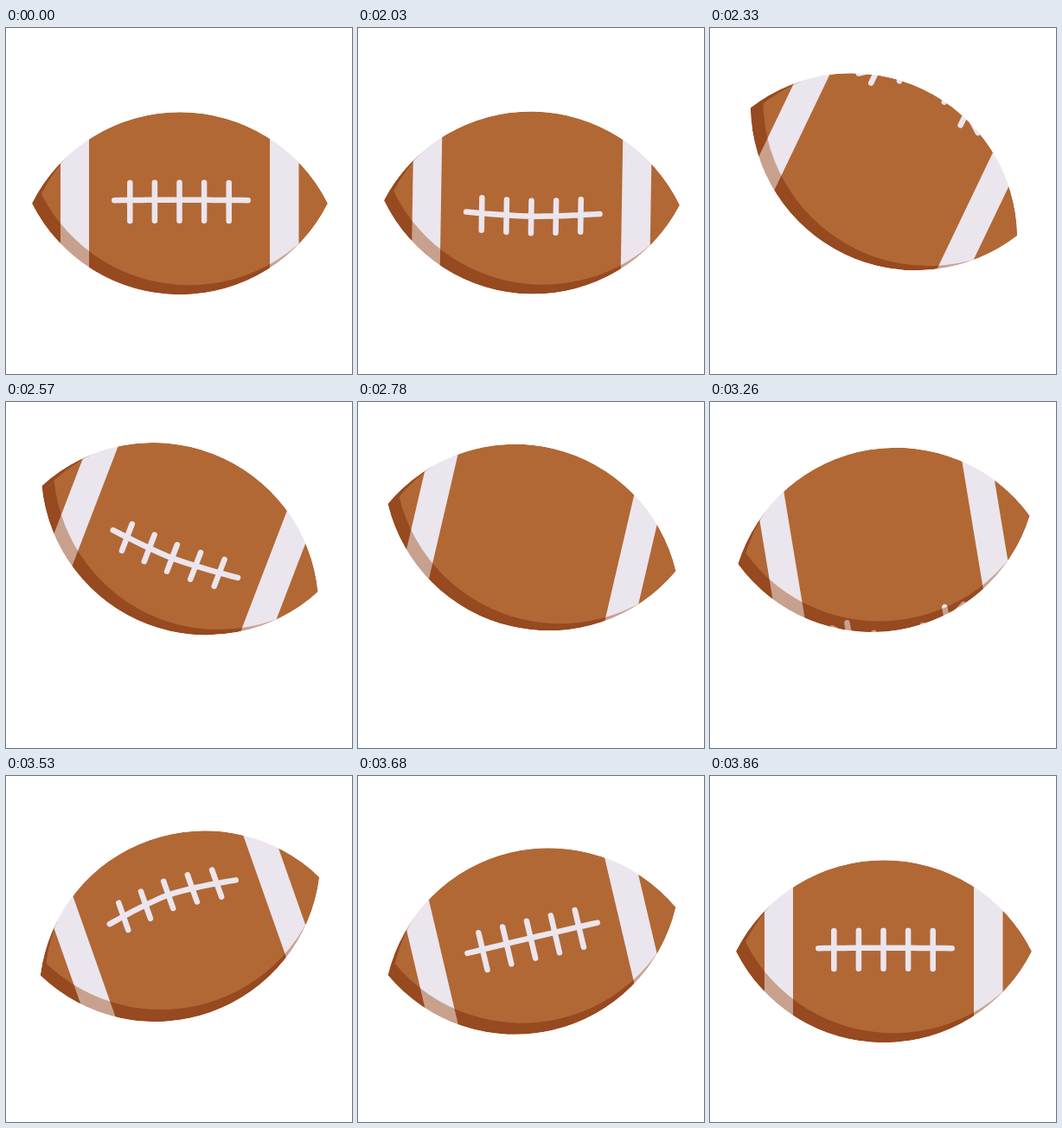
An HTML page for the animation above (3890 ms loop, 400x400 px).

```html
<!DOCTYPE html>
<html lang="en">
<head>
<meta charset="utf-8">
<title>Spinning football</title>
<style>
  html, body { margin: 0; width: 100%; height: 100%; overflow: hidden; background: #fff; }
  svg { display: block; width: 100vw; height: 100vh; }
  .tint { mix-blend-mode: multiply; }
  .stage { isolation: isolate; }
</style>
</head>
<body>
<svg viewBox="0 0 400 400">
  <defs>
    <path id="shape" d="M-171 0A191.3 191.3 0 0 1 171 0A191.3 191.3 0 0 1 -171 0Z"/>
    <clipPath id="outline"><use href="#shape"/></clipPath>
    <mask id="crescent" maskUnits="userSpaceOnUse" x="-180" y="-120" width="360" height="240">
      <rect x="-180" y="-120" width="360" height="240" fill="#fff"/>
      <use href="#shape" x="11" y="-11" fill="#000"/>
    </mask>
  </defs>
  <g id="ball" transform="translate(201 202.7)">
    <g class="stage" clip-path="url(#outline)">
      <use href="#shape" fill="#b16835"/>
      <path d="M-138-120h33v240h-33zM104-120h33.5v240h-33.5z" fill="#ebe5ed"/>
      <path id="laces" fill="none" stroke="#ebe5ed" stroke-width="6.5" stroke-linecap="round" stroke-linejoin="round"/>
      <use class="tint" href="#shape" fill="#d9b399" mask="url(#crescent)"/>
    </g>
  </g>
</svg>
<script>
const LOOP = 3890, REST = 2000, STEP = 30, LAST = 62;
const WRAP = 350, LACES_STOP = 53;

// Keys: [step, value, slope per step]
const TILT = [[0, 0, .45], [11, 25.6, .3], [19, 21, -1], [33, 4.2, -1.3], [52, -19.8, -.3], [62, 0, 0]];
const LIFT = [[0, 0, 0], [11, -36.5, -2.2], [19, -44.5, -.35], [33, -45.5, .3], [51, -29, 3], [54, -18.5, 3.5], [62, 0, 0]];
// Keys: [step, travelled distance]
const ROLL = [[0, -2], [1, 16.5], [11, 222], [19, 374], [33, 648.4], [51, 1011.4], [LACES_STOP, 1048]];

const ball = document.getElementById('ball');
const laces = document.getElementById('laces');

function segment(keys, s) {
  let i = 0;
  while (i < keys.length - 2 && s > keys[i + 1][0]) i++;
  return [keys[i], keys[i + 1]];
}

function hermite(keys, s) {
  const [[s0, v0, m0], [s1, v1, m1]] = segment(keys, s);
  const d = s1 - s0, u = (s - s0) / d, w = 1 - u;
  return v0 * w * w * (1 + 2 * u) + v1 * u * u * (3 - 2 * u)
    + d * u * w * (m0 * w - m1 * u);
}

function linear(keys, s) {
  const [[s0, v0], [s1, v1]] = segment(keys, s);
  return v0 + (v1 - v0) * (s - s0) / (s1 - s0);
}

function lacePath(step) {
  const s = Math.min(step, LACES_STOP);
  const dist = linear(ROLL, s);
  const y = dist - WRAP * Math.round(dist / WRAP);
  const fromRest = Math.min(s, LACES_STOP - s);
  const calm = [1, .4][fromRest] || 0;
  const sag = y * (.24 + 4e-6 * y * y);
  const bend = x => y - sag * Math.abs(x / 77) ** 1.5;
  const half = 16.5 + 5.5 * calm;

  let d = '';
  for (let i = 0; i <= 20; i++) {
    const x = -75.7 + 154.4 * i / 20;
    d += `${i ? 'L' : 'M'}${x.toFixed(2)} ${(bend(x) - 2 * calm).toFixed(2)}`;
  }
  for (let i = -2; i <= 2; i++) {
    const x = 28.6 * i - .5;
    d += `M${x} ${(bend(x) - half).toFixed(2)}v${2 * half}`;
  }
  return d;
}

function draw(now) {
  const t = now % LOOP;
  const step = Math.max(0, Math.min(LAST, Math.floor((t - REST) / STEP)));
  const y = 202.7 + hermite(LIFT, step);
  ball.setAttribute('transform', `translate(201 ${y}) rotate(${hermite(TILT, step)})`);
  laces.setAttribute('d', lacePath(step));
}

const start = performance.now();
function tick() {
  draw(performance.now() - start);
  requestAnimationFrame(tick);
}
tick();
</script>
</body>
</html>
```
